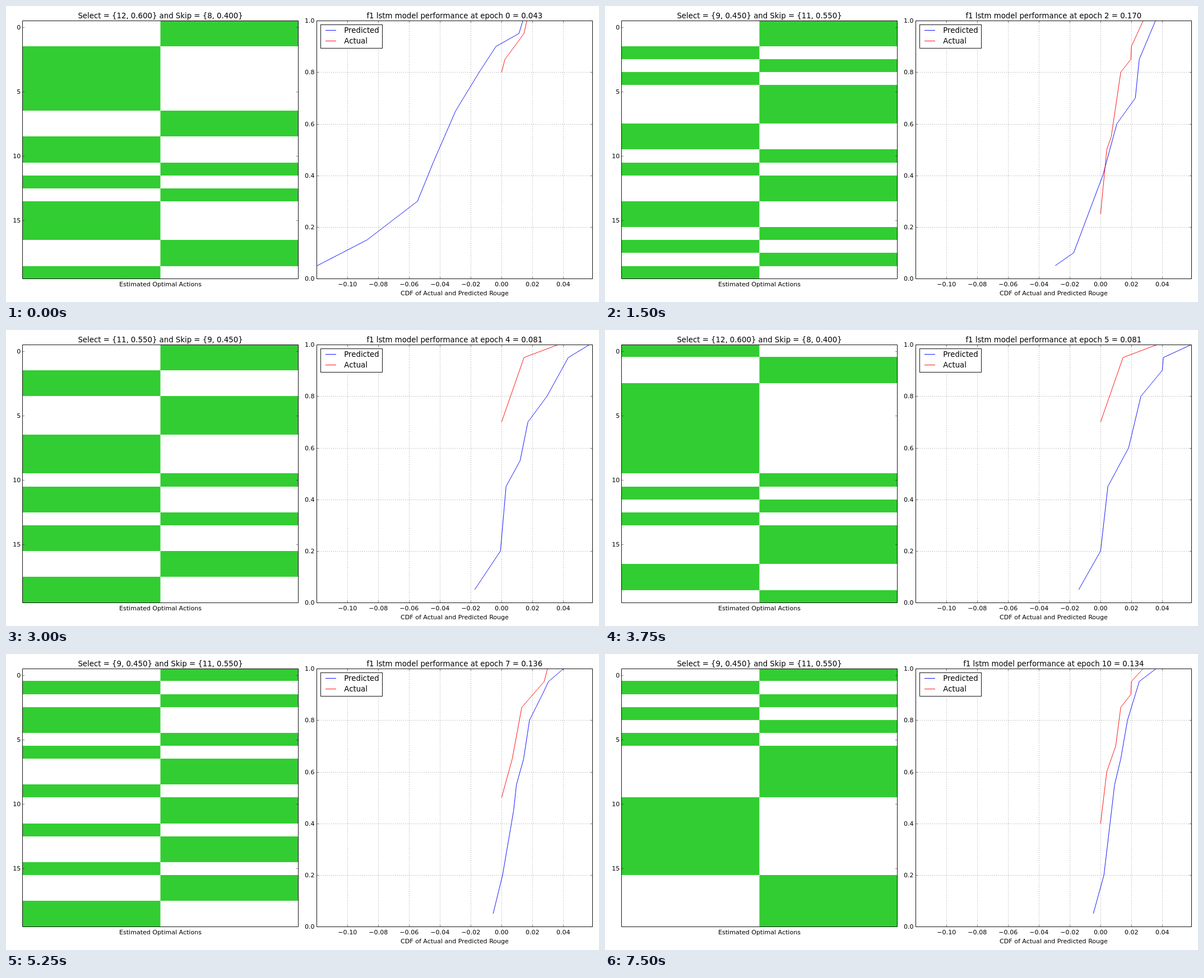
Recreate the animation shown at these times as an HTML page. Size 1058x529 px, loop 8000 ms.

```html
<!DOCTYPE html>
<html lang="en">
<head>
<meta charset="utf-8">
<title>Training progress</title>
<style>
  html, body { margin: 0; width: 100%; height: 100%; overflow: hidden; background: #fff; }
  svg { display: block; width: 100%; height: 100%; }
  text { font: 11.06px "DejaVu Sans", Verdana, sans-serif; fill: #000; }
  .big { font-size: 13.3px; }
  .mid { text-anchor: middle; }
  .end { text-anchor: end; }
  .frame { fill: none; stroke: #000; stroke-width: .92; }
  .tick { stroke: #000; stroke-width: .46; }
  .grid { stroke: #000; stroke-width: .46; stroke-dasharray: .92 2.76; }
  .line { fill: none; stroke-width: .92; stroke-linejoin: round; }
  .predicted { stroke: #00f; }
  .actual { stroke: #f00; }
  #cells { fill: #32cd32; }
</style>
</head>
<body>
<svg id="stage" viewBox="0 0 1058 529">
  <defs><clipPath id="plot"><rect x="554.5" y="26.5" width="492" height="461"/></clipPath></defs>
  <rect width="1058" height="529" fill="#fff"/>
  <path id="cells"/>
  <g clip-path="url(#plot)">
    <path id="predicted" class="line predicted"/>
    <path id="actual" class="line actual"/>
  </g>
  <g id="axes"></g>
  <text id="leftTitle" class="big mid" x="275.5" y="22"></text>
  <text id="rightTitle" class="big mid" x="800.3" y="22"></text>
</svg>
<script>
const STEP = 750, LOOP = 8000, COUNT = 20;
const LEFT = 29.5, MID = 275.5, RIGHT = 521.5;
const X0 = 554.5, X1 = 1046.5, ZERO = 884.2;
const TOP = 26.15, ROW = 23.05, BOTTOM = TOP + COUNT * ROW;
const $ = id => document.getElementById(id);

function add(tag, attrs, text = '') {
  const el = document.createElementNS('http://www.w3.org/2000/svg', tag);
  for (const key in attrs) el.setAttribute(key, attrs[key]);
  el.textContent = text;
  $('axes').append(el);
}
const path = (cls, d) => add('path', { class: cls, d });
const label = (cls, x, y, text) => add('text', { class: cls, x, y }, text);
const snap = v => Math.round(v) + .5;
const box = (x, y, x2, y2) => `M${x} ${y}H${x2}V${y2}H${x}z`;

function drawAxes() {
  const top = snap(TOP), bottom = snap(BOTTOM);
  for (let i = 0; i < COUNT; i += 5) {
    const y = snap(TOP + (i + .5) * ROW);
    path('tick', `M${LEFT} ${y}h3.7M${RIGHT} ${y}h-3.7`);
    label('end', 26.4, y + 3.6, i);
  }
  for (let i = 0; i <= 5; i++) {
    const y = snap(BOTTOM - i * ROW * 4);
    if (i % 5) path('grid', `M${X0} ${y}H${X1}`);
    path('tick', `M${X0} ${y}h3.7M${X1} ${y}h-3.7`);
    label('end', 550.6, y + 3.6, (i / 5).toFixed(1));
  }
  for (let i = -5; i <= 2; i++) {
    const x = snap(ZERO + i * 55);
    path('grid', `M${x} ${bottom}V${top}`);
    path('tick', `M${x} ${top}v3.7M${x} ${bottom}v-3.7`);
    label('mid', x - .2, 501, (i < 0 ? '\u2212' : '') + Math.abs(i * .02).toFixed(2));
  }
  path('frame', box(LEFT, top, RIGHT, bottom));
  path('frame', box(X0, top, X1, bottom));
  label('mid', 275.5, 501, 'Estimated Optimal Actions');
  label('mid', 800.5, 517, 'CDF of Actual and Predicted Rouge');

  add('rect', { class: 'frame', x: 561.5, y: 33.5, width: 110, height: 42, style: 'fill:#fff' });
  ['Predicted', 'Actual'].forEach((name, i) => {
    path('line ' + name.toLowerCase(), `M570 ${43.5 + i * 19}h19`);
    label('big', 603.3, 48 + i * 19, name);
  });
}

// Expands { step: offset from zero } key points into [step, offset] for every step.
function bend(keys) {
  const steps = Object.keys(keys).map(Number), points = [];
  for (let s = steps[0], k = 0; s < COUNT; s++) {
    while (k < steps.length - 2 && s > steps[k + 1]) k++;
    const a = steps[k], b = steps[k + 1];
    points.push([s, keys[a] + (keys[b] - keys[a]) * (s - a) / (b - a)]);
  }
  return points;
}
const mix = (a, b, k) => a.map(([s, x], i) => [s, x + (b[i][1] - x) * k]);

const wide = bend({ 0: -329, 2: -240, 5: -150, 8: -122, 12: -82, 15: -40, 17: -10, 18: 31, 19: 38 });
const second = bend({ 0: -81, 1: -48, 7: 4, 11: 29, 13: 62, 16: 69, 19: 98 });
const fourth = bend({ 0: -48, 3: -2, 8: 8, 10: 33, 13: 47, 15: 81, 18: 119, 19: 157 });
const fifth = bend({ 0: -39, 3: 0, 8: 13, 11: 50, 15: 72, 17: 110, 18: 112, 19: 162 });
const sixth = bend({ 0: -20, 3: -8, 8: 26, 10: 30, 12: 47, 15: 54, 17: 98, 19: 138 });
const eighth = bend({ 0: -15, 3: 0, 6: 10, 9: 35, 14: 49, 16: 70, 18: 106, 19: 112 });
const last = bend({ 0: -13, 3: 6, 10: 25, 12: 36, 15: 48, 18: 69, 19: 99 });

const short = bend({ 15: 0, 16: 6, 18: 40, 19: 45 });
const long = bend({ 4: 0, 9: 11, 10: 19, 15: 36, 16: 54, 17: 55, 19: 76 });
const flat = bend({ 13: 0, 18: 40, 19: 101 });
const steep = bend({ 9: 0, 12: 19, 16: 36, 18: 76, 19: 82 });
const late = bend({ 7: 0, 11: 11, 13: 27, 16: 36, 17: 54, 18: 55, 19: 76 });

// Per epoch: side chosen in each row, score, predicted curve, actual curve.
const epochs = [
  ['RRLLLLLRRLLRLRLLLRRL', .043, wide, short],
  ['LRRLLRLRRLLRRLRLLRLR', .170, mix(wide, second, .8), long],
  ['RRLRLRRRLLRLRRLLRLRL', .170, second, long],
  ['LRLLRRLRLLRLRRLLRLLR', .081, mix(second, fourth, .85), flat],
  ['RRLLRRRLLLRLLRLLRRLL', .081, fourth, flat],
  ['LRRLLLLLLLRLRLRRRLLR', .081, fifth, flat],
  ['RLLRLRLRLLRRLLRLLLRL', .136, sixth, steep],
  ['RLRLLRLRRLRRLRRLRRLL', .136, mix(sixth, last, .7), steep],
  ['RLRLRRLRRRRRRRRLRLRL', .136, eighth, steep],
  ['LRLRRLRLRRRLLRLRRLLR', .134, mix(sixth, last, .6), late],
  ['RLRLRLRRRRLLLLLLRRRR', .134, last, late]
];

const curve = points => 'M' + points.map(([s, x]) =>
  `${ZERO + x} ${TOP + (COUNT - 1 - s) * ROW}`).join('L');

// Cell edges fall on whole pixels; the raster is a touch taller than its frame.
const edge = row => Math.round(25.26 + row * 23.12);

// Neighbouring rows on one side merge into a single block.
function blocks(rows) {
  let d = '', row = 0;
  for (const run of rows.match(/L+|R+/g)) {
    const [x, x2] = run[0] === 'L' ? [LEFT, MID] : [MID, RIGHT];
    d += box(x, Math.max(edge(row), TOP), x2, Math.min(edge(row += run.length), BOTTOM));
  }
  return d;
}

function show(n) {
  const [rows, score, predicted, actual] = epochs[n];
  const select = rows.split('L').length - 1, skip = COUNT - select;
  const part = k => `{${k}, ${(k / COUNT).toFixed(3)}}`;
  $('cells').setAttribute('d', blocks(rows));
  $('predicted').setAttribute('d', curve(predicted));
  $('actual').setAttribute('d', curve(actual));
  $('leftTitle').textContent = `Select = ${part(select)} and Skip = ${part(skip)}`;
  $('rightTitle').textContent = `f1 lstm model performance at epoch ${n} = ${score.toFixed(3)}`;
}

let shown = -1;
function tick() {
  const n = Math.floor(performance.now() % LOOP / STEP);
  if (n !== shown) show(shown = n);
  requestAnimationFrame(tick);
}
drawAxes();
tick();
</script>
</body>
</html>
```
